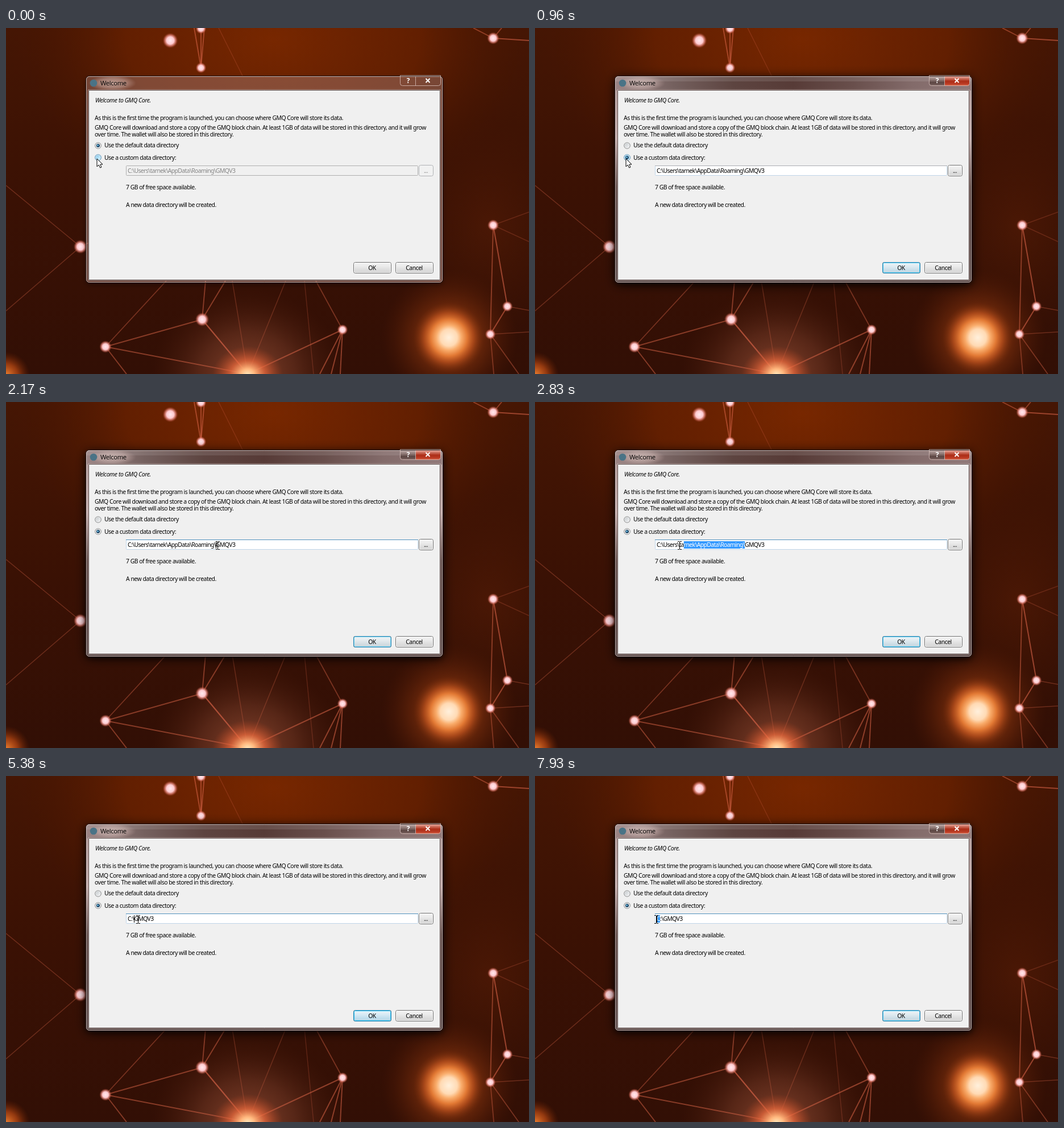
Animation, 920 px wide and 609 px high, one loop 8000 ms. Source, as an HTML page with a canvas:

```html
<!DOCTYPE html>
<html lang="en">
<head>
<meta charset="utf-8">
<title>Welcome dialog</title>
<style>
html, body { margin: 0; width: 100%; height: 100%; overflow: hidden; background: #3a1205; }
canvas { display: block; width: 920px; height: 609px; }
</style>
</head>
<body>
<canvas id="stage" width="920" height="609"></canvas>
<script>
const W = 920, H = 609, LOOP = 8000;
const stage = document.getElementById('stage').getContext('2d');
const UI = '10.4px "Noto Sans", "Open Sans", sans-serif';
const PATH = 'C:\\Users\\tarnek\\AppData\\Roaming\\GMQV3';
const SHORT = 'C:\\GMQV3';

// Bursts of screen updates: first, last, count
const BURSTS = [
  [250, 1230, 8], [1360, 2170, 7], [2420, 3100, 6], [3490, 4060, 5], [4460, 4960, 3],
  [5380, 6030, 5], [6300, 6300, 1], [6580, 6880, 3], [7420, 7420, 1], [7690, 7930, 2]
];
const TICKS = [0];
for (const [a, b, n] of BURSTS)
  for (let i = 0; i < n; i++) TICKS.push(n > 1 ? a + (b - a) * i / (n - 1) : a);

// Pointer: time, x
const POINTER = [
  [0, 160], [1360, 262], [1495, 331], [1630, 352], [1765, 366], [1900, 372],
  [2556, 345], [2692, 300], [2828, 254], [2964, 218], [3100, 229], [3490, 231],
  [3632, 235], [3775, 232], [5700, 228], [5860, 225], [6030, 223],
  [6580, 219], [6730, 216], [6880, 213]
];
const pointerY = t => t < 1360 ? 230 : t < 1765 ? 257 : 252;

// Selection: time, caret index, anchor index
const SELECTION = [
  [1900, 32, 32], [2556, 28, 32], [2692, 20, 32], [2828, 11, 32], [2964, 1, 32],
  [3100, 2, 32], [3775, 3, 32], [4710, 3, 3], [6580, 1, 1], [6880, 0, 1]
];
const latest = (keys, t) => keys.filter(k => k[0] <= t).pop();

function gradient(c, x0, y0, x1, y1, colors) {
  const g = c.createLinearGradient(x0, y0, x1, y1);
  colors.forEach((v, i) => g.addColorStop(i / (colors.length - 1), v));
  return g;
}

// stops: offset, colour, ...
function glow(c, x, y, rx, ry, ...stops) {
  const g = c.createRadialGradient(0, 0, 0, 0, 0, rx);
  for (let i = 0; i < stops.length; i += 2) g.addColorStop(stops[i], stops[i + 1]);
  c.save();
  c.translate(x, y);
  c.scale(1, ry / rx);
  c.fillStyle = g;
  c.fillRect(-rx, -rx, 2 * rx, 2 * rx);
  c.restore();
}

function box(c, x, y, w, h, r, fill, stroke, line = 1) {
  c.beginPath();
  c.roundRect(x, y, w, h, r);
  if (fill) { c.fillStyle = fill; c.fill(); }
  if (stroke) { c.strokeStyle = stroke; c.lineWidth = line; c.stroke(); }
}

function text(c, s, x, y, { font = UI, color = '#000', spacing = -0.48, align = 'left' } = {}) {
  c.font = font;
  c.letterSpacing = spacing + 'px';
  c.textAlign = align;
  c.fillStyle = color;
  c.fillText(s, x, y);
}

function link(c, x0, y0, x1, y1, strength) {
  c.strokeStyle = `rgba(215,100,72,${strength * .85})`;
  c.lineWidth = 1 + strength * 1.5;
  c.beginPath();
  c.moveTo(x0, y0);
  c.lineTo(x1, y1);
  c.stroke();
}
// Links from one point to several on a horizontal or a vertical line
const fanY = (c, x, y, edge, strength, ...xs) => xs.forEach(v => link(c, x, y, v, edge, strength));
const fanX = (c, x, y, edge, strength, ...ys) => ys.forEach(v => link(c, x, y, edge, v, strength));

function mesh(c) {
  const behind = 445;
  fanY(c, 343, 70, 0, .65, 331, 343, 349);
  fanY(c, 416, 84, 0, .3, 374);
  fanY(c, 857, 18, 0, .6, 822, 872);
  fanY(c, 857, 347, 490, .7, 882);
  fanY(c, 857, 347, 539, .6, 852);
  fanY(c, 882, 490, 539, .7, 852);
  fanY(c, 852, 539, H, .5, 902, 858);
  fanY(c, 345, 513, behind, .6, 351, 386);
  fanY(c, 345, 513, H, .8, 425);
  fanY(c, 345, 513, 561, .6, 175);
  fanY(c, 175, 561, behind, .5, 282);
  fanY(c, 175, 561, H, .6, 212, 425);
  fanY(c, 592, 531, behind, .5, 545);
  fanY(c, 592, 531, H, .65, 425, 552, 572, 588);
  fanY(c, 425, H, behind, .35, 492, 398);
  fanY(c, 541, H, behind, .3, 525);
  fanX(c, 131, 385, 0, .4, 277, 498);
  fanX(c, 131, 385, 200, .5, 352);
  fanX(c, 857, 347, W, .3, 324, 376);
  fanX(c, 857, 18, W, .7, 22);
  fanX(c, 882, 490, W, .4, 497);
  fanX(c, 852, 539, W, .4, 535);
}

function wallpaper() {
  const cv = document.createElement('canvas');
  cv.width = W; cv.height = H;
  const c = cv.getContext('2d');
  c.fillStyle = gradient(c, 0, 0, 0, H, ['#451604', '#3a1104', '#320f05']);
  c.fillRect(0, 0, W, H);
  glow(c, 470, 20, 470, 300, 0, 'rgba(122,40,0,.95)', .55, 'rgba(108,34,0,.75)', 1, 'rgba(70,20,0,0)');
  glow(c, 850, 350, 150, 190, 0, 'rgba(95,32,6,.45)', 1, 'rgba(80,26,4,0)');
  glow(c, 425, 609, 170, 150, 0, 'rgba(160,85,60,.75)', .5, 'rgba(105,50,32,.65)', 1, 'rgba(70,25,10,0)');
  glow(c, 780, 545, 120, 120, 0, 'rgba(170,70,20,.8)', .5, 'rgba(120,45,12,.65)', 1, 'rgba(80,25,5,0)');
  mesh(c);
  glow(c, 425, 610, 62, 50, 0, '#ffe9bb', .2, '#ffb77d', .5, 'rgba(235,105,60,.7)', 1, 'rgba(180,65,30,0)');
  glow(c, 0, 612, 42, 42, 0, '#f38432', .5, 'rgba(190,75,20,.7)', 1, 'rgba(120,40,5,0)');
  glow(c, 779, 545, 62, 62, 0, '#fff0dc', .24, '#ffdab4', .36, '#f9ac6b',
    .52, '#e27934', .7, 'rgba(188,82,30,.75)', 1, 'rgba(120,45,12,0)');

  const nodes = [
    [289, 22, 10], [343, 1, 7], [343, 70, 7], [857, 18, 8], [131, 385, 9], [857, 347, 7.5],
    [882, 490, 7], [852, 539, 7], [345, 513, 9], [175, 561, 8], [592, 531, 7]
  ];
  for (const [x, y, r] of nodes)
    glow(c, x, y, r * 1.35, r * 1.35, 0, '#ffe9ee', .48, '#ffcbd0', .72, 'rgba(230,135,125,.7)', 1, 'rgba(170,60,40,0)');
  return cv;
}

function shadow(c, blur, alpha) {
  c.save();
  c.shadowColor = `rgba(0,0,0,${alpha})`;
  c.shadowBlur = blur;
  c.shadowOffsetY = 3;
  box(c, 141, 85, 627, 363, 6, '#000');
  c.restore();
}

function frame(c, wall, active) {
  shadow(c, 8, .45);
  if (active) { c.globalAlpha = active; shadow(c, 20, .85); c.globalAlpha = 1; }
  c.save();
  c.beginPath();
  c.roundRect(140.5, 84.5, 628, 364, 6);
  c.clip();
  c.drawImage(wall, 0, 0);
  c.fillStyle = 'rgba(178,142,136,.38)';
  c.fillRect(140, 84, 630, 366);
  if (active) {
    c.globalAlpha = active;
    c.fillStyle = gradient(c, 140, 0, 769, 0,
      ['#9b8585', '#74605e', '#5d4440', '#573b37', '#694f4c', '#836b6a', '#907979']);
    c.fillRect(140, 84, 630, 27);
    c.fillStyle = 'rgba(255,255,255,.1)';
    c.fillRect(140, 84, 630, 10);
    c.fillStyle = gradient(c, 0, 110, 0, 449, ['#ab9696', '#bfa9a9', '#594542', '#4e3c3b', '#564746']);
    c.fillRect(140, 110, 630, 340);
    c.globalAlpha = 1;
  }
  c.restore();
  glow(c, 187, 97, 42, 14, 0, 'rgba(235,215,210,.6)', .6, 'rgba(225,200,195,.4)', 1, 'rgba(210,180,175,0)');
  box(c, 140.5, 84.5, 628, 364, 6, null, '#1b1110');
  box(c, 141.5, 85.5, 626, 362, 5, null, 'rgba(240,220,215,.7)');
  box(c, 145.5, 109.5, 618, 334, 1, '#f0f0f0', '#4d3c3a');
  box(c, 144.5, 108.5, 620, 336, 1, null, 'rgba(235,215,212,.5)');

  c.fillStyle = '#4a7386';
  c.beginPath();
  c.arc(154, 97, 6.3, 0, 7);
  c.fill();
  text(c, 'Welcome', 166, 101, { font: '11.3px "Open Sans", "Noto Sans", sans-serif', spacing: -.4 });
  caption(c, active);
}

function caption(c, active) {
  c.globalAlpha = active;
  box(c, 694, 85, 27, 17, [0, 0, 0, 4], gradient(c, 0, 85, 0, 102, ['#bcaaa8', '#937d7a', '#594340', '#846b68']));
  box(c, 721, 85, 43, 17, [0, 0, 4, 0], gradient(c, 0, 85, 0, 102, ['#e2aaa0', '#cc6b59', '#ad2f19', '#b93720', '#d9674b']));
  c.globalAlpha = 1;
  box(c, 693.5, 83.5, 71, 18, [0, 0, 4, 4], null, 'rgba(225,200,195,.75)');
  c.strokeStyle = 'rgba(225,200,195,.75)';
  c.beginPath();
  c.moveTo(720.5, 85);
  c.lineTo(720.5, 101);
  c.stroke();
  text(c, '?', 707.5, 97, { font: 'bold 12px "Open Sans", sans-serif', color: '#fff', spacing: 0, align: 'center' });
  c.strokeStyle = '#fff';
  c.lineWidth = 2;
  c.beginPath();
  c.moveTo(738.5, 89); c.lineTo(745.5, 96);
  c.moveTo(745.5, 89); c.lineTo(738.5, 96);
  c.stroke();
}

function radio(c, x, y, on, hover) {
  const disc = (r, fill) => { c.beginPath(); c.arc(x, y, r, 0, 7); c.fillStyle = fill; c.fill(); };
  disc(5.8, hover ? '#4b8fba' : '#858788');
  disc(4.8, '#f7f7f7');
  disc(4, gradient(c, x - 4, y - 4, x + 4, y + 4, hover ? ['#84c9ed', '#d8f2fd'] : ['#c6cace', '#f3f4f5']));
  if (on) {
    disc(3, '#173f60');
    c.beginPath();
    c.arc(x - .5, y - .5, 1.6, 0, 7);
    c.fillStyle = '#6bb7dc';
    c.fill();
  }
}

function button(c, x, y, w, h, label, { heat = 0, focus = false, enabled = true } = {}) {
  const plain = ['#f4f4f4', '#ececec', '#dedede', '#d0d0d0'];
  box(c, x + .5, y + .5, w - 1, h - 1, 3, enabled ? gradient(c, 0, y, 0, y + h, plain) : '#f1f1f1', enabled ? '#707070' : '#b0b2b5');
  if (enabled) box(c, x + 1.5, y + 1.5, w - 3, h - 3, 2, null, '#fafafa');
  if (focus) {
    c.globalAlpha = .15 + heat * .5;
    box(c, x + 1, y + 1, w - 2, h - 2, 2, gradient(c, 0, y, 0, y + h, ['#e5f5fd', '#d3edfb', '#b4e0f7', '#a0d6f2']));
    c.globalAlpha = 1;
    box(c, x + .5, y + .5, w - 1, h - 1, 3, null, '#3383ae');
    box(c, x + 1.5, y + 1.5, w - 3, h - 3, 2, null, `rgba(45,195,240,${.6 + heat * .4})`);
  }
  text(c, label, x + w / 2 - .5, y + h / 2 + 4, { align: 'center', color: enabled ? '#000' : '#777' });
}

function field(c, t, enabled) {
  box(c, 211.5, 242.5, 513, 17, 1, enabled ? '#fff' : '#f0f0f0', enabled ? '#bfd5e8' : '#afafaf');
  if (enabled) {
    c.fillStyle = t >= 1360 ? '#4f90bd' : '#abadb3';
    c.fillRect(211, 242, 514, 1);
  }
  const value = t >= 4710 ? SHORT : PATH;
  const left = 214, base = 255, spacing = -.6;
  text(c, value, left, base, { color: enabled ? '#000' : '#838383', spacing });
  const sel = latest(SELECTION, t);
  if (!sel) return;
  const at = i => left + c.measureText(value.slice(0, i)).width;
  const [, caret, anchor] = sel;
  const a = at(caret), b = at(anchor);
  if (anchor > caret) {
    c.fillStyle = '#3399ff';
    c.fillRect(a, 245, b - a, 13);
    text(c, value.slice(caret, anchor), a, base, { color: '#fff', spacing });
  }
  if (Math.floor((t - 2000) / 540) % 2 === 0) {
    c.fillStyle = '#000';
    c.fillRect(Math.round(a), 245, 1, 13);
  }
}

function arrow(c, x, y) {
  const pts = [[0, 0], [0, 14], [3.2, 11], [5.6, 16], [8, 15], [5.7, 10.2], [10, 10]];
  c.beginPath();
  pts.forEach(([dx, dy]) => c.lineTo(x + dx, y + dy));
  c.closePath();
  c.fillStyle = '#fff';
  c.fill();
  c.strokeStyle = '#000';
  c.lineWidth = 1;
  c.stroke();
}

function beam(c, x, y) {
  c.fillStyle = '#000';
  c.fillRect(x, y - 6, 1, 13);
  for (const end of [y - 7, y + 7]) {
    c.fillRect(x - 3, end, 3, 1);
    c.fillRect(x + 1, end, 3, 1);
  }
}

function draw(c, t) {
  const active = t < 250 ? 0 : t < 390 ? .5 : 1;
  const custom = t >= 670;
  const heat = .5 - .5 * Math.cos((t - 390) / 2000 * 2 * Math.PI);
  c.drawImage(wall, 0, 0);
  frame(c, wall, active);

  text(c, 'Welcome to GMQ Core.', 157, 131, { font: 'italic ' + UI, spacing: -.4 });
  text(c, 'As this is the first time the program is launched, you can choose where GMQ Core will store its data.', 156, 162);
  text(c, 'GMQ Core will download and store a copy of the GMQ block chain. At least 1GB of data will be stored in this directory, and it will grow', 156, 179);
  text(c, 'over time. The wallet will also be stored in this directory.', 156, 191);
  text(c, 'Use the default data directory', 173, 210);
  text(c, 'Use a custom data directory:', 173, 231.5);
  text(c, '7 GB of free space available.', 211, 284);
  text(c, 'A new data directory will be created.', 211, 315);

  radio(c, 162, 207, !custom, false);
  radio(c, 162, 228, custom, t < 1360);
  field(c, t, custom);
  button(c, 726, 241, 26, 20, '...', { enabled: custom });
  button(c, 611, 412, 67, 20, 'OK', { focus: active > 0, heat });
  button(c, 685, 412, 67, 20, 'Cancel');

  (t < 1360 ? arrow : beam)(c, latest(POINTER, t)[1], pointerY(t));
}

const wall = wallpaper();
function tick() {
  const t = performance.now() % LOOP;
  draw(stage, TICKS.filter(k => k <= t).pop());
  requestAnimationFrame(tick);
}
tick();
</script>
</body>
</html>
```
